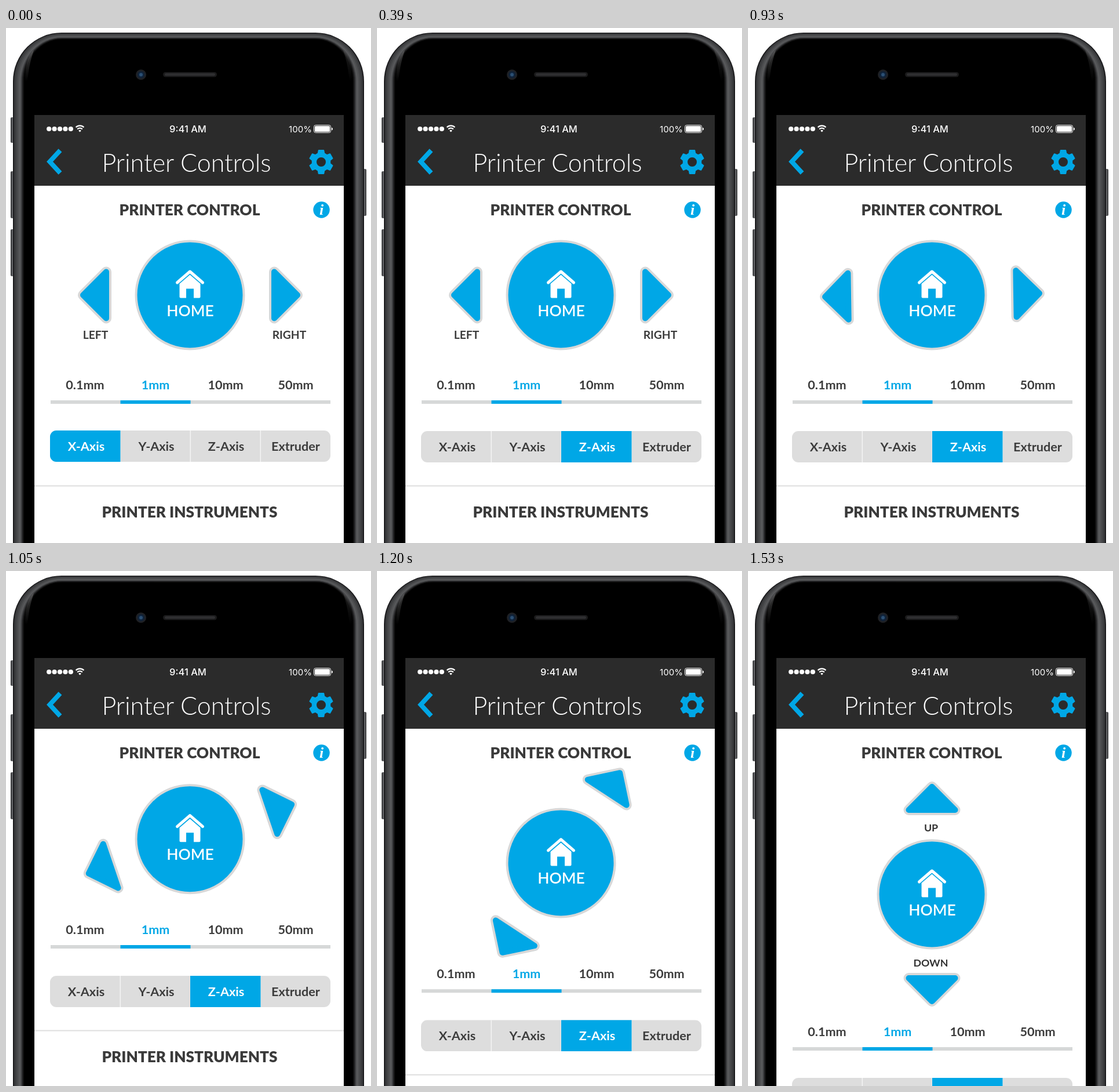
Animation of 630x888 px, one loop 2670 ms. Source, as an HTML page:

```html
<!DOCTYPE html>
<html lang="en">
<head>
<meta charset="utf-8">
<title>Printer Controls</title>
<style>
  html, body { margin: 0; width: 100%; height: 100%; overflow: hidden; background: #fff; }
  svg { display: block; width: 630px; height: 888px; font-family: Lato, sans-serif; }
  text { text-anchor: middle; }
  .status { font-family: Inter, sans-serif; fill: #fff; }
  .heading { font-weight: 900; font-size: 26.2px; fill: #3a3a3a; }
  .label { font-weight: 700; font-size: 19.3px; fill: #3c3c3c; }
  .small { font-weight: 700; font-size: 17.8px; fill: #333; }
  .item { font-weight: 700; font-size: 21.6px; }
</style>
</head>
<body>
<svg viewBox="0 0 630 888">
  <defs>
    <linearGradient id="key"><stop stop-color="#2a2b2d"/><stop offset=".5" stop-color="#6c6d70"/><stop offset="1" stop-color="#2c2c2e"/></linearGradient>
    <linearGradient id="gloss" x2="0" y2="1"><stop stop-color="#777" stop-opacity=".5"/><stop offset="1" stop-color="#777" stop-opacity="0"/></linearGradient>
    <path id="arrow" d="M184.5 0L144.5 -40V40Z" stroke-linejoin="round"/>
    <g id="button">
      <use href="#arrow" fill="#d8d8d8" stroke="#d8d8d8" stroke-width="18"/>
      <use href="#arrow" fill="#00a7e6" stroke="#00a7e6" stroke-width="10"/>
    </g>
    <clipPath id="pill"><rect x="76" y="694" width="484" height="54" rx="11"/></clipPath>
    <clipPath id="screen"><rect x="49" y="150" width="534" height="738"/></clipPath>
  </defs>

  <g fill="url(#key)">
    <rect x="8" y="154" width="7" height="44" rx="2"/>
    <rect x="8" y="247" width="7" height="81" rx="2"/>
    <rect x="8" y="347" width="7" height="81" rx="2"/>
    <rect x="616" y="243" width="6" height="81" rx="2"/>
  </g>
  <g id="body"></g>
  <path d="M33 92C33 65 38 48 48 38C44 52 40 62 37 92Z" fill="url(#gloss)"/>
  <path d="M597 92C597 65 592 48 582 38C586 52 590 62 593 92Z" fill="url(#gloss)" opacity=".5"/>
  <circle cx="233" cy="80.500" r="9" fill="#1f2125"/>
  <circle cx="233" cy="80.500" r="6" fill="#10233a"/>
  <circle cx="233" cy="80.500" r="3" fill="#2b4f73"/>
  <rect x="271" y="76" width="93" height="8.500" rx="4.200" fill="#1a1a1b"/>
  <rect x="274" y="78" width="87" height="4.500" rx="2.200" fill="#2e2e30"/>

  <g clip-path="url(#screen)">
    <rect x="49" y="150" width="534" height="738" fill="#fff"/>
    <rect x="49" y="150" width="534" height="122" fill="#2b2b2b"/>
    <path d="M74.200 174h.01m9.400 0h.01m9.400 0h.01m9.400 0h.01m9.400 0h.01" stroke="#fff" stroke-width="8.200" stroke-linecap="round"/>
    <g fill="none" stroke="#fff" stroke-width="2.200">
      <path d="M120.600 171.200a9.800 9.800 0 0 1 13.800 0M123.200 174.500a6 6 0 0 1 8.600 0"/>
      <path d="M127.500 179.500l-2.300-2.500a3.200 3.200 0 0 1 4.600 0z" fill="#fff" stroke="none"/>
    </g>
    <text class="status" x="314" y="179.800" font-size="16.500" font-weight="500">9:41 AM</text>
    <text class="status" x="508" y="179.800" font-size="15">100%</text>
    <rect x="531.500" y="167.500" width="29" height="13" rx="3" fill="none" stroke="#fff"/>
    <rect x="533" y="169" width="26" height="10" rx="1.500" fill="#fff"/>
    <path d="M562 171.500q2 .5 2 2.500t-2 2.500z" fill="#fff"/>
    <path d="M93.500 211L75.500 230.500L93.500 250" fill="none" stroke="#00a7e6" stroke-width="8"/>
    <text x="311.500" y="247.500" font-size="43" font-weight="300" fill="#fff">Printer Controls</text>
    <path id="gear" fill="#00a7e6" fill-rule="evenodd" stroke="#00a7e6" stroke-width="2" stroke-linejoin="round" transform="translate(544 231)"/>
    <text class="heading" x="317" y="323">PRINTER CONTROL</text>
    <circle cx="544.500" cy="313.500" r="14.200" fill="#00a7e6"/>
    <text x="544.500" y="322" font-family="Liberation Serif, serif" font-size="26" font-weight="700" font-style="italic" fill="#fff">i</text>

    <g id="sides">
      <text class="label" x="154.500" y="535.500">LEFT</text>
      <text class="label" x="489" y="535.500">RIGHT</text>
    </g>
    <g id="ends">
      <text class="small" x="316" y="448.500">UP</text>
      <text class="small" x="315.500" y="682">DOWN</text>
    </g>

    <g id="home">
      <g id="spin">
        <use href="#button" x="1"/>
        <use href="#button" transform="rotate(180)"/>
      </g>
      <circle r="93" fill="#00a7e6" stroke="#d8d8d8" stroke-width="4"/>
      <path d="M-22 -21.500L0 -40.500L22 -21.500" fill="none" stroke="#fff" stroke-width="5" stroke-linecap="round" stroke-linejoin="round"/>
      <path d="M-18 -19.500L0 -35L18 -19.500V3q0 2 -2 2H6.500V-11H-6.500V5H-16q-2 0 -2 -2Z" fill="#fff"/>
      <text x=".5" y="36" font-size="26.400" font-weight="600" fill="#fff">HOME</text>
    </g>

    <g id="lower">
      <g id="tabs"></g>
      <rect x="77" y="642" width="483" height="6" fill="#d6d8d8"/>
      <rect x="197.500" y="642" width="121" height="6" fill="#00a7e6"/>
      <g id="axisX"></g>
      <g id="axisZ" transform="translate(0 1)"></g>
      <rect x="49" y="788.500" width="534" height="2" fill="#dedede"/>
      <text class="heading" x="317" y="844">PRINTER INSTRUMENTS</text>
    </g>
  </g>
</svg>
<script>
const LOOP = 2670, STEP = 30;
const BLUE = '#00a7e6', DARK = '#3c3c3c';
const $ = id => document.getElementById(id);
const item = (x, y, fill, s) => `<text class="item" x="${x}" y="${y}" fill="${fill}">${s}</text>`;

// Phone shell: nested rounded outlines as [inset, colour]; the rim is thinner at the top
const shell = [[0, '#1a1a1c'], [2, '#393a3c'], [5, '#444547'], [8, '#505153'], [11, '#5a5b5d'],
  [13, '#48494b'], [15, '#2a2a2c'], [17, '#111'], [19, '#000']];
$('body').innerHTML = shell.map(([d, c]) =>
  `<rect x="${12 + d}" y="${8 + .6 * d}" width="${606 - 2 * d}" height="1000" rx="${84 - d}" ry="${84 - .6 * d}" fill="${c}"/>`).join('');

function gearPath() {
  const pts = [];
  for (let i = 0; i < 6; i++)
    for (const [a, r] of [[-20, 15.5], [-12, 20.5], [12, 20.5], [20, 15.5]]) {
      const q = (i * 60 + a - 90) * Math.PI / 180;
      pts.push((r * Math.cos(q)).toFixed(2) + ' ' + (r * Math.sin(q)).toFixed(2));
    }
  return 'M' + pts.join('L') + 'ZM9 0A9 9 0 1 0 -9 0A9 9 0 1 0 9 0Z';
}
$('gear').setAttribute('d', gearPath());

const centers = [136.5, 258, 379, 500];
$('tabs').innerHTML = ['0.1mm', '1mm', '10mm', '50mm']
  .map((s, i) => item(centers[i], 623, i === 1 ? BLUE : DARK, s)).join('');

function segments(active) {
  const names = ['X-Axis', 'Y-Axis', 'Z-Axis', 'Extruder'];
  let out = '<g clip-path="url(#pill)"><rect x="76" y="694" width="484" height="54" fill="#ddd"/>';
  for (let i = 1; i < 4; i++)
    out += `<rect x="${76 + 121 * i - .5}" y="694" width="1.5" height="54" fill="#f4f4f4"/>`;
  out += `<rect x="${76 + 121 * active}" y="694" width="121.500" height="54" fill="${BLUE}"/></g>`;
  return out + names.map((s, i) =>
    item(centers[i] + (i < 3 ? 2 - i / 2 : 0), 729, i === active ? '#fff' : DARK, s)).join('');
}
$('axisX').innerHTML = segments(0);
$('axisZ').innerHTML = segments(2);

const ramp = (t, a, b) => Math.min(1, Math.max(0, (t - a) / (b - a)));
const ease = u => u * u * (3 - 2 * u);

function draw(now) {
  const t = Math.floor((now % LOOP) / STEP) * STEP;
  const turn = ease(ramp(t, 900, 1410));
  const drop = ease(ramp(t, 1020, 1410));
  const swap = ramp(t, 240, 390);
  $('axisX').style.opacity = swap < 1 ? 1 : 0;
  $('axisZ').style.opacity = swap;
  $('sides').style.opacity = 1 - ramp(t, 660, 780);
  $('ends').style.opacity = ramp(t, 1410, 1530);
  $('spin').setAttribute('transform', `rotate(${-90 * turn})`);
  $('home').setAttribute('transform', `translate(317.5 ${460.5 + 97 * drop})`);
  $('lower').setAttribute('transform', `translate(0 ${179 * drop})`);
}
const start = performance.now();
function tick() {
  draw(performance.now() - start);
  requestAnimationFrame(tick);
}
tick();
</script>
</body>
</html>
```
